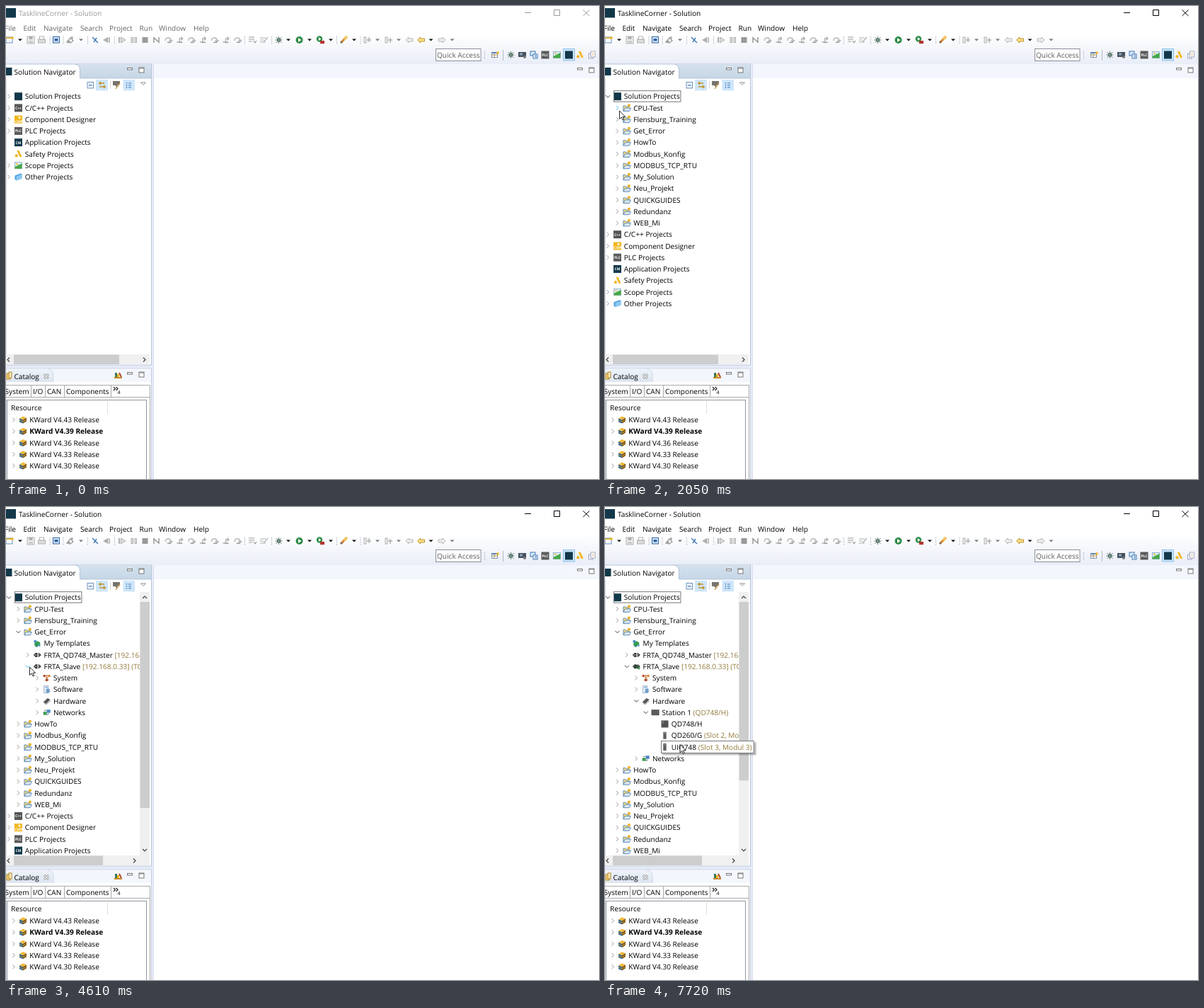
Write an HTML page that moves like this. It is 838 px wide and 668 px high and loops after 8000 ms.

```html
<!DOCTYPE html>
<html lang="en">
<head>
<meta charset="utf-8">
<title>Project tree walkthrough</title>
<style>
  html, body { margin: 0; width: 100%; height: 100%; overflow: hidden; background: #fff; }
  svg { display: block; width: 100vw; height: 100vh; }
  text { font: 10.1px "Open Sans", "Noto Sans", sans-serif; fill: #000; white-space: pre; text-rendering: geometricPrecision; }
  .bold { font-weight: 700; }
  .note { fill: #937a3c; }
  .tiny { font-size: 5px; font-weight: 700; fill: #fff; }
</style>
</head>
<body>
<svg id="stage" viewBox="0 0 838 668" preserveAspectRatio="none"></svg>
<script>
const LOOP = 8000, ROW = 16.25, TOP = 127.7, INDENT = 13.4;
const NAVY = '#12384a', GREY = '#b0b0b0', YELLOW = '#f2b51c', BLUE = '#3f78b5';
const stage = document.getElementById('stage');

// Markup helpers
const rect = (x, y, w, h, fill, more = '') => `<rect x="${x}" y="${y}" width="${w}" height="${h}" fill="${fill}" ${more}/>`;
const box = (x, y, w, h, stroke, fill = 'none') => rect(x, y, w, h, fill, `stroke="${stroke}"`);
const line = (d, stroke, w = 1, more = '') => `<path d="${d}" fill="none" stroke="${stroke}" stroke-width="${w}" ${more}/>`;
const shape = (d, fill, more = '') => `<path d="${d}" fill="${fill}" ${more}/>`;
const dot = (x, y, r, fill) => `<circle cx="${x}" cy="${y}" r="${r}" fill="${fill}"/>`;
const text = (x, y, s, cls = '') => `<text x="${x}" y="${y}" class="${cls}">${s}</text>`;
const at = (x, y, s) => `<g transform="translate(${x} ${y})">${s}</g>`;
const tile = (fill, s = '') => rect(-5.5, -5.5, 11, 11, fill) + (s && `<text class="tiny" text-anchor="middle" y="2">${s}</text>`);
const CLOSED = 'M-1.6 -3L1.3 0L-1.6 3', OPEN = 'M-3 -1.5L0 1.5L3 -1.5';

// Icons are centred on 0,0
const bug = line('M-4 -4L4 4M4 -4L-4 4M-5 0H5M0 -5V5', '#4d6258', .8) + dot(0, 0, 2.8, '#4f7264') + dot(0, 0, 1.1, '#a9c5b8');
const icons = {
  solution: tile(NAVY),
  cpp: tile('#555', 'C++'),
  cmp: tile(YELLOW) + text(-4.8, 4.5, 'CMP', 'tiny') + rect(0, -4, 3, 3, '#fff3c8'),
  plc: tile('#5a5a5a', 'PLC'),
  cm: tile(NAVY, 'CM'),
  safety: shape('M-2 -5H1L5 4H2Z', YELLOW) + dot(-2.6, 2.4, 2.1, YELLOW),
  scope: rect(-5, -4.5, 10, 9, '#d9edf9', 'stroke="#7a9fc0" stroke-width=".7"') + shape('M-5 4.5V2L-1 0L5 -3V4.5Z', '#46a846') + dot(-2, -2, 1.2, YELLOW),
  other: shape('M-5 -2L3 -5L5 -4V2L-3 5L-5 3Z', '#4aa0df') + shape('M-3 -1L5 -4V2L-3 5Z', '#8cc9f2'),
  folder: shape('M-5 4V-3H-2L-1 -2H3V4Z', '#f3da7c', `stroke="${BLUE}" stroke-width=".8"`) + shape('M-5 4.5L-2.5 0H5.5L3.5 4.5Z', '#dce6ea', `stroke="${BLUE}" stroke-width=".8"`) + dot(3, -3.6, 2.1, '#edb32c'),
  puzzle: rect(-4, -3, 6, 6, '#39a04c') + dot(-3, -3, 2, '#4f8fd0') + dot(2, 0, 2.2, '#39a04c') + dot(-1, 3, 2, '#2d8b66') + dot(3, 3, 1.4, '#4f8fd0'),
  plug: shape('M-5.5 0L-2.5 -3H0V3H-2.5Z', '#333') + rect(1, -3, 1.8, 6, '#777') + shape('M2.8 -2.6L5.5 0L2.8 2.6Z', '#333') + line('M-4 0H-1', '#ddd', .9),
  system: line('M-4 -3.5L3 3.5M4 -3.5L-3 3.5M-4 -3.5H4M0 -4V4', '#c0703c', 1) + dot(-3.6, -3, 1.7, '#b9502e') + dot(3.6, -3, 1.7, '#d9893f') + dot(0, 3, 1.8, '#a74a2b'),
  software: rect(-4, -5, 6, 10, '#e9f1f9', 'stroke="#8aa6c4" stroke-width=".8"') + rect(-1, -1, 5, 5.5, '#6d9dcc') + line('M-2.5 -3H1', BLUE, .8),
  hardware: shape('M-5 1.5L1 -4L5 -2L-1 4Z', '#555') + line('M-4 3L-1 5L5 0', '#999', 1),
  networks: rect(-5, -1, 5, 4.5, '#3f9a54') + rect(0, -4, 5, 4.5, '#4b86c6') + line('M-3 -2V-3H0M2 1V3H0', '#4a6a58', .8),
  station: rect(-5.5, -4, 11, 8, '#555') + line('M-2.5 -4V4M0 -4V4M2.5 -4V4', '#777', .6),
  module: rect(-5, -5, 10, 10, '#515151') + rect(-4, -4, 3, 3, '#777'),
  slot: rect(-2.2, -5, 4.4, 10, '#5d5f5b') + rect(-1.5, -4, 3, 1.5, '#858a82'),
  bug,
  stack: shape('M-5 -2L0 -5L5 -3L0 0Z', '#f0b93a') + shape('M-5 -2L0 0V5L-5 3Z', '#2f628f') + shape('M0 0L5 -3V2L0 5Z', '#7a5518') + line('M-5 .7L0 2.6L5 0', '#e3aa2e', .8),
};
icons.online = icons.plug + rect(-3, -2, 5, 4.5, '#2b4630') + dot(3.4, 2.6, 1.8, '#3a9248');

// Tree: depth, icon, label, opening time (0 = leaf), note
const NEVER = Infinity;
const nodes = [[0, 'solution', 'Solution Projects', 1640]];
const folder = (name, opens = NEVER) => nodes.push([1, 'folder', name, opens]);
['CPU-Test', 'Flensburg_Training'].forEach(n => folder(n));
folder('Get_Error', 3120);
nodes.push(
  [2, 'puzzle', 'My Templates', 0],
  [2, 'plug', 'FRTA_QD748_Master', NEVER, '[192.168.0.32] (TCP)'],
  [2, 'plug', 'FRTA_Slave', 4530, '[192.168.0.33] (TCP)'],
  [3, 'system', 'System', NEVER],
  [3, 'software', 'Software', NEVER],
  [3, 'hardware', 'Hardware', 5760],
  [4, 'station', 'Station 1', 6770, '(QD748/H)'],
  [5, 'module', 'QD748/H', 0],
  [5, 'slot', 'QD260/G', 0, '(Slot 2, Modul 2)'],
  [5, 'slot', 'UIQ748', 0, '(Slot 3, Modul 3)'],
  [3, 'networks', 'Networks', NEVER]);
['HowTo', 'Modbus_Konfig', 'MODBUS_TCP_RTU', 'My_Solution', 'Neu_Projekt', 'QUICKGUIDES', 'Redundanz', 'WEB_Mi'].forEach(n => folder(n));
nodes.push(
  [0, 'cpp', 'C/C++ Projects', NEVER],
  [0, 'cmp', 'Component Designer', NEVER],
  [0, 'plc', 'PLC Projects', NEVER],
  [0, 'cm', 'Application Projects', 0],
  [0, 'safety', 'Safety Projects', 0],
  [0, 'scope', 'Scope Projects', NEVER],
  [0, 'other', 'Other Projects', NEVER]);

// Cursor moves: start, end, steps, then points passed on the way
const moves = [
  [190, 950, 11, [250, 330], [60, 185], [36, 164]],
  [1030, 1410, 6, [6, 128]],
  [1800, 2050, 4, [20.5, 148]],
  [2110, 2190, 2, [28, 157]],
  [2340, 2430, 2, [27, 170]],
  [2590, 2830, 4, [20, 177]],
  [3520, 4220, 10, [44, 196], [47, 213], [33.5, 226]],
  [4990, 5380, 6, [56, 251], [54, 263], [44, 274]],
  [6160, 6160, 1, [55, 284]],
  [6230, 6310, 2, [67, 287]],
  [6540, 6540, 1, [57, 287]],
  [7080, 7640, 8, [80, 302], [100, 320], [106, 335.5]],
];
const clicks = [[1640, 1720], [3120, 3220], [4530, 4610]];
const TIP_AT = 7720;

// Static window
const arrowDown = (x, y, c = '#111') => shape(`M${x - 3} ${y - 1.5}h6l-3 3z`, c);
const minMax = (x, y) => box(x - 3.5, y - 2, 7, 2.5, '#777', '#fff') + box(x + 13, y - 2.5, 7, 7, '#777', '#fff') + line(`M${x + 13} ${y - 1.5}h7`, '#777');
const dots = (x, y) => line(`M${x} ${y - 5}v11`, '#9aa3b5', 1, 'stroke-dasharray="1.3 1.7"');
const backArrow = (x, c, fill, dir = 1) => at(x, 48, `<g transform="scale(${dir} 1)">${shape('M-5 0L-1 -4V-2H5V2H-1V4Z', fill, `stroke="${c}" stroke-width=".9"`)}</g>`);

function toolbar() {
  let s = at(5, 48, rect(-5, -4, 9, 8, '#f7f9fd', `stroke="${BLUE}" stroke-width=".8"`) + rect(-5, -4, 9, 2, '#d8b04a') + dot(4, -3, 1.8, YELLOW));
  s += at(35, 48, box(-5, -5, 10, 10, GREY, '#eee') + rect(-2.5, -5, 5, 4, GREY) + rect(-3, 1, 6, 4, '#ccc'));
  s += at(50.5, 48, box(-5, -1, 10, 5, GREY, '#ddd') + box(-3, -5, 6, 4, GREY, '#fff'));
  s += at(71, 48, box(-4.5, -4.5, 9, 8.5, '#2d62a0', '#dceafa') + rect(-2.5, -2, 5, 3.5, '#2d62a0'));
  s += at(91, 48, line('M-5 3L0 -3L4 1L0 4Z', '#999', 1.2) + dot(2, -3, 2, GREY) + dot(-2, 2, 1.6, '#999'));
  s += line('M122 44L130 52M124 51L128 45', BLUE, 1.4);
  s += shape('M137 48L143 44.5V51.5Z', GREY) + box(143.5, 45, 3, 6, GREY, '#ddd');
  s += rect(159, 44, 2, 8, GREY) + shape('M162.5 44L169 48L162.5 52Z', '#ddd', `stroke="${GREY}"`);
  s += box(177, 44.5, 2.5, 7, GREY, '#ddd') + box(182, 44.5, 2.5, 7, GREY, '#ddd') + rect(192.5, 44, 8, 8, '#999');
  s += line('M209 52V45L216 51V44', '#999', 1.5);
  for (let i = 0; i < 7; i++) {
    const x = 229 + i * 16.3;
    s += line(i % 2 ? `M${x - 4} 51h4v-5h4M${x + 2} 43.5l2.5 2.5l-2.5 2.5` : `M${x - 4} 49q1 -5 5 -4t3 5M${x + 1.5} 48l2.5 2.5l2.5 -2.5`, GREY, 1.3) + rect(x - 1, 50.5, 5, 1.6, '#999');
  }
  s += line('M343 44h8M343 47h8M343 50h5M350 49l2 3l2 -3', '#999', 1.1) + line('M359 45h8M359 48h5M359 51h8M364 51l6 -7', GREY, 1.2);
  s += at(385.5, 48, bug);
  s += dot(414.5, 48, 5, '#2c8a45') + shape('M413 45L417.5 48L413 51Z', '#fff');
  s += dot(443, 46.5, 4.2, '#2c8a45') + shape('M441.8 44L445.5 46.5L441.8 49Z', '#fff') + rect(444, 49, 6, 4.2, '#b2362f');
  s += line('M473 52L479 46', '#d98a2b', 3) + line('M478 47L482 43', '#f2c467', 4) + line('M473 52L475 50', '#666', 2);
  for (const x of [511, 541]) s += line(`M${x - 3} 44v8M${x + 2} ${x < 520 ? 44 : 52}v${x < 520 ? 7 : -7}M${x - 1} 48h6`, GREY, 1.5) + box(x - 5, 44, 3, 8, GREY, '#eee');
  s += backArrow(570, GREY, '#eee') + backArrow(586.5, '#b88a1e', '#fae08a') + backArrow(616, GREY, '#eee', -1);
  for (const x of [20, 399, 429, 459, 492, 600.5]) s += arrowDown(x, 48);
  for (const x of [106, 525, 555, 630.5]) s += arrowDown(x, 48, '#777');
  for (const x of [62, 81, 115.5, 153.5, 337.5, 375.5, 467.5, 501]) s += dots(x, 48);
  return s;
}

function perspectives() {
  let s = box(607.5, 60.5, 63.5, 17, '#8b8f99', '#fff') + `<text x="609" y="73" style="fill:#5b5b5b">Quick Access</text>` + dots(676.5, 69) + line('M702.5 62v15', '#b3b8c4');
  s += at(691, 69, box(-4.5, -3.5, 8, 7, '#7f93ad', '#fff') + rect(-4.5, -4, 8, 2, '#5d86b6') + line('M-1 -2V4M-4 0H4', '#a58a52') + dot(4, -3, 1.8, YELLOW));
  s += at(713.5, 69, bug);
  s += at(730, 69, rect(-6, -4, 11, 7, '#46525e') + rect(-4, -2.5, 4, 3, '#8ea2b5') + dot(3, 3, 2, '#777'));
  s += at(746, 69, box(-5, -5, 7, 6, BLUE, '#d9e9f8') + box(-1, -1, 6, 6, BLUE, '#fff') + line('M1 1h3M1 3h3', BLUE));
  s += at(762, 69, icons.plc) + at(778.5, 69, icons.scope);
  s += box(787.5, 60.5, 16, 16.5, '#8fc2ea', '#cbe5fa') + at(795.5, 69, icons.solution);
  return s + at(811, 69, icons.safety) + at(827.5, 69, box(-4, -2, 6, 7, '#a3abc0', '#eef1f8') + box(-1, -5, 6, 8, '#a3abc0', '#fff') + line('M1 -2h2M1 0h2', '#d9a65a'));
}

function navigator() {
  let s = rect(0, 82, 205.5, 425, '#fff', 'stroke="#b7c6da"') + rect(0, 82.5, 205, 19.5, 'url(#tabs)');
  s += shape('M0 83H98Q104 83 104 90V102.5H0Z', '#fff') + line('M98 82.5Q104.5 82.5 104.5 90V102H205', '#b3c5d8');
  s += at(3, 92.5, icons.solution) + text(11.5, 96.8, 'Solution Navigator') + minMax(175, 89.5);
  s += rect(127, 104, 17, 15.5, '#cfe6fa') + rect(165.5, 104, 16.5, 15.5, '#cfe6fa');
  s += box(115, 107.5, 8.5, 8.5, '#6f93bb', '#eef5fc') + line('M117 112h4.5', BLUE, 1.2);
  s += line('M139 109h-7l2 -2M132 109l2 2M132 114h8l-2 -2M140 114l-2 2', '#c1922a', 1.5) + line('M147.5 106v11', '#d0d4dc');
  s += shape('M151 106h10v5l-4 1v3l-3 -3h-3z', '#77736d') + line('M155 117L161 109', '#c79c55', 1.3);
  s += line('M170.5 108v8', BLUE, 1.5, 'stroke-dasharray="1.6 1.6"') + line('M173 109h4M173 112h4M173 115h4', BLUE);
  return s + shape('M190.5 108h7l-3.5 3.5z', '#fff', 'stroke="#777" stroke-width=".8"');
}

function catalog() {
  let s = rect(0, 512, 205.5, 160, '#fff', 'stroke="#c3cde0"') + rect(0, 512.5, 205, 18.5, '#f3f6fc');
  s += shape('M0 513H59Q66 513 67 521V531H0Z', 'url(#cat)') + line('M59 512.5Q66.5 513 67 521V531', '#d0d8e6');
  s += box(1, 519, 5, 8, '#b48a2e', '#f4d079') + box(4, 517, 4, 8, '#b48a2e', '#fbe9b6') + text(11.5, 527.3, 'Catalog');
  s += line('M54 520l6 6M60 520l-6 6', '#777', 2.6) + line('M54 520l6 6M60 520l-6 6', '#fff', 1.1);
  s += rect(154, 518, 3, 6, '#3a7a5a') + rect(157, 520, 3, 4, YELLOW) + line('M160 518l3 6', '#b2452f', 2) + rect(153, 524, 11, 2, '#c48b2c') + minMax(175, 519.5);
  s += line('M0 535.5H203.5V668M0 552.5H203', '#a9a9a9') + line('M35.5 536v16M55.5 536v16M82.5 536v16M148.5 536v16', '#a9a9a9');
  [[-1.5, 'System'], [38, 'I/O'], [58, 'CAN'], [85, 'Components']].forEach(([x, n]) => s += text(x, 547.8, n));
  s += line('M152 538l2.5 2.5l-2.5 2.5M155.5 538l2.5 2.5l-2.5 2.5', '#222', 1.2) + `<text x="157.5" y="548" style="font-size:7px">4</text>`;
  s += box(1.5, 556.5, 197, 120, '#8f959e', '#fff') + line('M143.5 558v18', '#e0e0e0') + text(7, 570.7, 'Resource');
  ['43', '39', '36', '33', '30'].forEach((v, i) => {
    const y = 584.4 + i * ROW;
    s += at(11, y, line(CLOSED, '#9a9a9a')) + at(24, y, icons.stack) + text(33.3, y + 3.6, `KWard V4.${v} Release`, i === 1 ? 'bold' : '');
  });
  return s;
}

const menu = [[-2, 'File'], [24.5, 'Edit'], [53, 'Navigate'], [105, 'Search'], [146, 'Project'], [188.5, 'Run'], [216, 'Window'], [265, 'Help']];
const gradient = (id, a, b) => `<linearGradient id="${id}" x2="0" y2="1"><stop stop-color="${a}"/><stop offset="1" stop-color="${b}"/></linearGradient>`;

stage.innerHTML = `<defs>${gradient('bar', '#ffffff', '#e9edf7')}${gradient('tabs', '#d5e1ed', '#c5d6e6')}${gradient('cat', '#eef3f9', '#dce5f0')}
  <clipPath id="view"><rect id="viewBox" x="0" y="119" width="203" height="373"/></clipPath></defs>`
  + rect(0, 0, 838, 668, '#fff') + rect(0, 40, 838, 42, 'url(#bar)') + rect(0, 81, 209, 587, '#e6ebf7')
  + rect(208.5, 82, 630, 586, '#fff') + rect(208.5, 82, 630, 20, '#f3f6fd') + line('M208.5 668V82', '#d8dff0') + minMax(811, 89.5)
  + rect(0, 3, 14, 13.5, NAVY)
  + `<g id="caption">${text(18, 13.6, 'TasklineCorner - Solution')}${line('M733 9.5h9M774.5 5.5h8v8h-8zM815.5 5.5l9 8.5M824.5 5.5l-9 8.5', 'currentColor')}</g>`
  + `<g id="menu">${menu.map(([x, n]) => text(x, 35.4, n)).join('')}</g>`
  + toolbar() + perspectives() + navigator()
  + `<g clip-path="url(#view)" id="tree"></g><g id="bars"></g>` + catalog()
  + `<g id="tip"></g><circle id="ring" r="11" fill="#ffe92e" fill-opacity=".6"/>`
  + `<path id="cursor" d="M0 0V11.4L2.7 9L4.5 13L6.3 12.2L4.6 8.3H8.2Z" fill="#fff" stroke="#111" stroke-width=".9"/>`;

const get = id => document.getElementById(id);
const show = (el, on) => el.setAttribute('visibility', on ? 'inherit' : 'hidden');
const move = (el, x, y) => el.setAttribute('transform', `translate(${x} ${y})`);
const label = (x, name, note) => `<text x="${x}" y="3.6">${name}${note ? ` <tspan class="note">${note}</tspan>` : ''}</text>`;

const rows = nodes.map(([depth, icon, name, opens, note]) => {
  const x = 26.8 + depth * INDENT;
  const g = document.createElementNS('http://www.w3.org/2000/svg', 'g');
  g.innerHTML = rect(x - 1, -7.8, 0, 15.6, '#e3f1fc') + `<g>${at(x - 9.3, 0, icons[icon])}</g>` + label(x, name, note)
    + (opens ? `<path fill="none" transform="translate(${x - 22.7} 0)"/>` : '');
  get('tree').append(g);
  const [glow, picture, caption, chevron] = g.children;
  const width = caption.getComputedTextLength();
  glow.setAttribute('width', width + 2);
  return { g, x, depth, name, opens, width, glow, picture, chevron };
});
const root = rows[0], slave = rows.find(r => r.name === 'FRTA_Slave'), last = rows.find(r => r.name === 'UIQ748');
root.g.insertAdjacentHTML('beforeend', box(12.5, -8, root.width + 15.5, 15.5, '#777'));
const focus = root.g.lastChild;
get('tip').innerHTML = rect(81, -6.5, last.width + 19, 18, '#000', 'opacity=".25"') + box(79.5, -8.5, last.width + 17, 17, '#777', '#fff')
  + at(last.x - 9.3, 0, icons.slot) + label(last.x, 'UIQ748', '(Slot 3, Modul 3)');

function cursorAt(t) {
  let from = [820, 712];
  for (const [t0, t1, n, ...points] of moves) {
    if (t < t0) break;
    const k = t >= t1 ? n : Math.floor((t - t0) / (t1 - t0) * (n - 1) + 0.02) + 1;
    const path = [from, ...points], u = k / n * points.length;
    const i = Math.min(Math.floor(u), points.length - 1), f = u - i;
    from = path[i].map((v, j) => v + (path[i + 1][j] - v) * f);
  }
  return from;
}

function scrollBars(count) {
  const tall = count > 22, right = tall ? 189 : 203;
  let s = rect(0, 492, 203, 14.5, '#f0f0f0') + rect(11, 492.5, tall ? 126 : 149, 13.5, '#cdcdcd');
  s += line('M5 496.5L2 499.5L5 502.5', '#444', 1.2) + line(`M${right - 9} 496.5l3 3l-3 3`, '#444', 1.2);
  if (tall) {
    s += rect(189, 120, 14, 372, '#f0f0f0') + rect(189.5, 134, 13.5, 344 * 22 / count, '#cdcdcd');
    s += line('M193 129l3 -3l3 3M193 483l3 3l3 -3', '#444', 1.2);
  }
  get('viewBox').setAttribute('width', right);
  get('bars').innerHTML = s;
}

let shown = -1;
function draw(t) {
  const [cx, cy] = cursorAt(t), inside = t >= 190, active = t >= 1640;
  let count = 0, hiddenBelow = Infinity;
  for (const r of rows) {
    const visible = r.depth <= hiddenBelow;
    show(r.g, visible);
    if (!visible) continue;
    const open = r.opens && t >= r.opens;
    hiddenBelow = open ? Infinity : r.depth;
    const y = TOP + ROW * count++;
    move(r.g, 0, y);
    const over = inside && Math.abs(cy - y) < ROW / 2;
    show(r.glow, over && cx >= r.x - 15 && cx <= r.x + r.width);
    if (r.chevron) {
      const hot = over && Math.abs(cx - r.x + 22.7) < 6;
      r.chevron.setAttribute('d', open ? OPEN : CLOSED);
      r.chevron.setAttribute('stroke', hot ? '#4fc1ee' : open ? '#404040' : '#9d9d9d');
    }
    if (r === last) move(get('tip'), 0, y);
  }
  if (count !== shown) scrollBars(shown = count);

  const link = t >= 4990 ? 'online' : 'plug';
  if (slave.link !== link) slave.picture.innerHTML = at(slave.x - 9.3, 0, icons[slave.link = link]);
  show(focus, active);
  get('caption').style.color = active ? '#000' : '#999';
  get('caption').firstChild.style.fill = active ? '#000' : '#999';
  for (const m of get('menu').children) m.style.fill = active ? '#000' : '#666';

  show(get('tip'), t >= TIP_AT);
  show(get('ring'), clicks.some(([a, b]) => t >= a && t < b));
  move(get('ring'), cx, cy);
  show(get('cursor'), inside);
  move(get('cursor'), cx, cy);
}

const start = performance.now();
function tick() {
  draw((performance.now() - start) % LOOP);
  requestAnimationFrame(tick);
}
tick();
</script>
</body>
</html>
```
